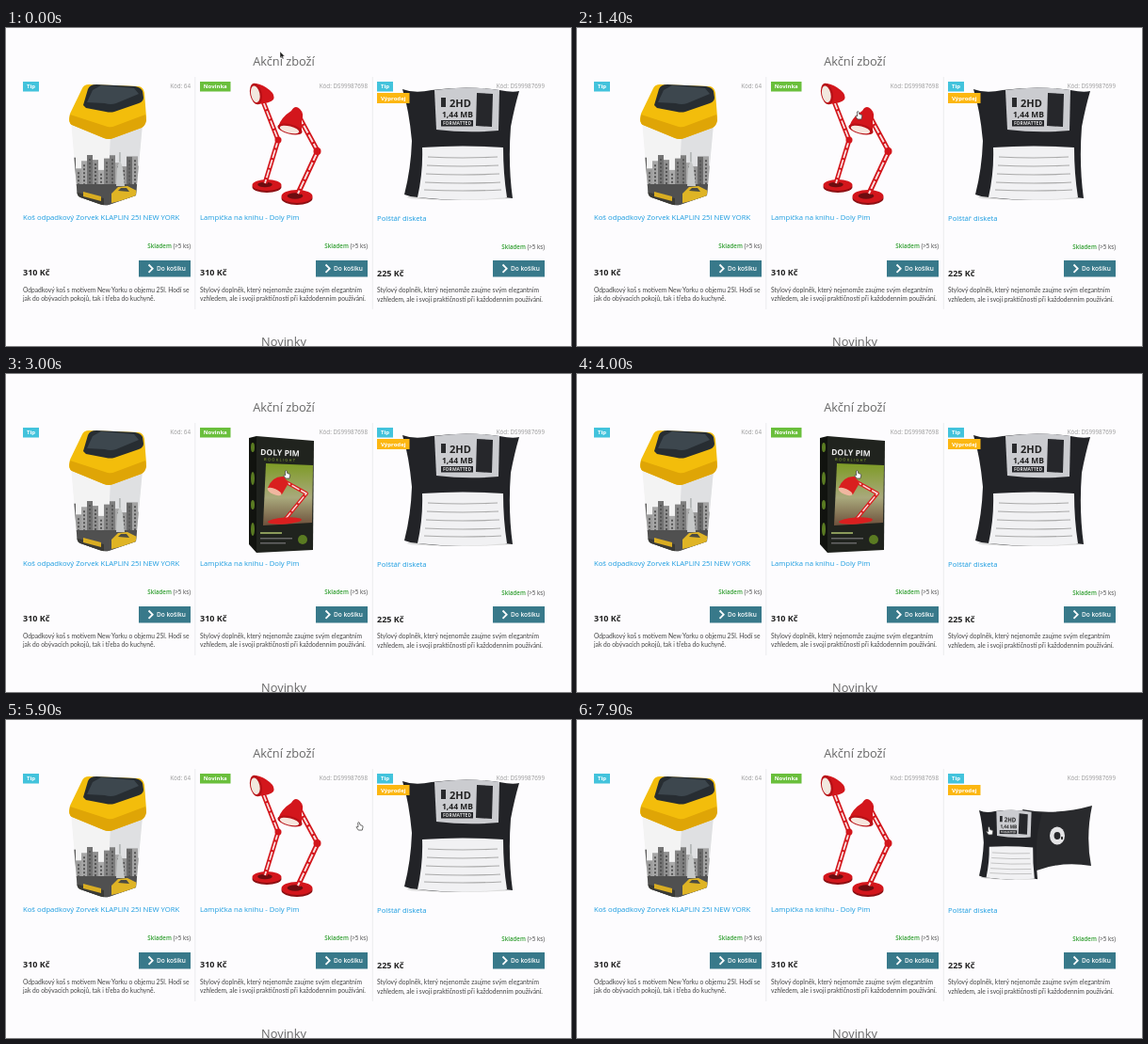
Write an HTML page that moves like this. It is 600 by 338 pixels and loops after 8 s.

```html
<!DOCTYPE html>
<html lang="cs">
<head>
<meta charset="utf-8">
<title>Akční zboží</title>
<style>
  html, body { margin: 0; height: 100%; overflow: hidden; background: #fdfcfe; }
  svg { display: block; width: 100vw; height: 100vh; font: 6.2px "Open Sans", sans-serif; }
  .head { font-size: 12.8px; fill: #666; text-anchor: middle; }
  .name { font-size: 7.7px; fill: #1a9ce0; }
  .code { font-size: 6.25px; fill: #999; text-anchor: end; }
  .stock { text-anchor: end; fill: #444; }
  .stock tspan { fill: #2f9e2f; font-weight: 600; }
  .price { font-size: 9px; font-weight: 700; fill: #222; }
  .button { font-size: 6.5px; font-weight: 600; fill: #fff; }
  .badge { font-size: 6px; font-weight: 700; fill: #fff; text-anchor: middle; }
  .note { font: 6.7px Lato, sans-serif; fill: #444; }
</style>
</head>
<body>
<svg id="stage" viewBox="0 0 600 338"></svg>
<script>
const stage = document.getElementById('stage');

const poly = (points, fill, extra = '') => `<polygon points="${points}" fill="${fill}" ${extra}/>`;
const path = (d, fill, extra = '') => `<path d="${d}" fill="${fill}" ${extra}/>`;
const rect = (x, y, w, h, fill) => `<rect x="${x}" y="${y}" width="${w}" height="${h}" fill="${fill}"/>`;
const oval = (x, y, rx, ry, fill, turn = 0) =>
  `<ellipse cx="${x}" cy="${y}" rx="${rx}" ry="${ry}" fill="${fill}" transform="rotate(${turn} ${x} ${y})"/>`;
const text = (x, y, cls, s, extra = '') => `<text x="${x}" y="${y}" class="${cls}" ${extra}>${s}</text>`;

// Two parallel rails with rungs between them
const arm = (d, width = 5) => path(d, 'none', `stroke="currentColor" stroke-width="${width}" stroke-linejoin="round"`) +
  path(d, 'none', `stroke="#fff" stroke-width="${width * .36}" stroke-dasharray="9 2" stroke-opacity=".85"`);

const badge = (x, y, w, h, fill, label) => rect(x, y, w, h, fill) + text(x + w / 2, y + h / 2 + 2.1, 'badge', label);

function card({ x, dy, code, name, price, note }) {
  return text(x + 178, 63.5, 'code', 'Kód: ' + code) +
    text(x, 204 + dy, 'name', name) +
    text(x + 178, 234.3 + dy, 'stock', '<tspan>Skladem</tspan> (&gt;5 ks)') +
    text(x, 263.3 + dy, 'price', price + ' Kč') +
    rect(x + 123, 247, 55, 17.5, '#38798a') +
    path(`M${x + 133.5} 251.5l4.2 4.2-4.2 4.2`, 'none', 'stroke="#fff" stroke-width="1.8"') +
    text(x + 142, 258, 'button', 'Do košíku') +
    note.map((line, i) => text(x, 280.6 + dy + i * 9.6, 'note', line)).join('');
}

function skyline() {
  let out = '';
  for (let i = 0; i < 13; i++) {
    const h = 30 + 17 * Math.abs(Math.sin(i * 2.3 + 1));
    const shade = 95 + Math.round(75 * Math.abs(Math.sin(i * 4.1)));
    out += rect(68 + i * 6, 182 - h, 6, h + 10, `rgb(${shade},${shade},${shade})`);
    out += path(`M${71 + i * 6} ${186 - h}v${h - 9}`, 'none', 'stroke="#555" stroke-width="2" stroke-dasharray="2 2"');
  }
  return out;
}

const bin = `<clipPath id="body"><path d="M69 98L145 102L138 178L109 188Q104 189 99 187L79 180Q76 179 75.5 175Z"/></clipPath>
  <g clip-path="url(#body)">${rect(66, 95, 82, 95, '#f3f3f3')}${poly('112,95 148,95 148,190 107,190', '#dfe0e2')}
  ${skyline()}${rect(66, 166, 82, 25, '#505050')}
  ${poly('117,168 118,149 121,140 124,149 126,168', '#c6c8c8')}${rect(120, 132, 1.8, 10, '#b5b8b8')}
  ${poly('72,174 104,181 104,189 75,184', '#3a3a36')}
  ${poly('82,174 101,179 101,184 82,179', '#d9ad22')}${poly('112,176 119,169 129,168 139,173 137,180 112,186', '#dfb425')}
  ${poly('119,173 122,170 128,170 131,174', '#4b4b42')}</g>` +
  path('M67 97L68 91L81 64Q83 60 88 60L141 62Q146 63 147 69L149 95Q149 103 144 106L114 117Q109 119 104 117L70 103Q67 101 67 97Z', '#f3bd0b') +
  path('M68 92L108 105Q112 106 116 104L148 92L149 98Q148 104 144 106L114 117Q109 119 104 117L70 103Q66 101 68 92Z', '#dfa506') +
  path('M82 82L87 65Q89 60 96 60L137 62Q143 63 145 67L146 74Q146 78 141 80L115 89Q111 90 106 89L85 85Z', '#272d32') +
  path('M92 66L101 61L136 64L141 70L117 80Q111 82 105 80L86 79Z', '#3d474e');

const lampBase = (x, y, rx, ry) => oval(x, y + 2, rx, ry, '#8c1014') + oval(x, y, rx, ry, 'currentColor') +
  oval(x - 2, y - .5, rx * .5, ry * .45, '#6c0d10');

const redLamps = `<g color="#d3161c">
  ${lampBase(277, 167, 15.5, 6)}${arm('M273 78L289 119L275 165')}
  ${oval(289, 119, 3.5, 3.5, 'currentColor')}
  ${path('M265 59Q273 60 280 66Q286 71 284 76Q281 80 267 81Z', 'currentColor')}
  ${oval(265.5, 70, 6.3, 11.5, '#b81117', -12)}${oval(264.8, 70.3, 4.6, 9, '#f2e8df', -12)}
  ${lampBase(309, 179, 16.5, 7)}${arm('M311 94L331 131L310 176', 5.5)}
  ${oval(330.5, 131, 4, 4, 'currentColor')}
  ${path('M289 105Q292 95 303 88Q307 81 312 86Q317 91 314 98L314 111Z', 'currentColor')}
  ${oval(301.5, 107.5, 13.4, 5.2, '#b81117', 14)}${oval(301, 108, 10.5, 3.6, '#f6e6de', 14)}</g>`;

const lampBox = poly('258,68 266,66 266,190 258,181', '#11130f') + poly('266,66 327,71 326,187 266,190', '#20231e') +
  [78, 111, 139, 165].map((y, i) => oval(262, y, 2, i % 2 ? 7 : 5, '#5a7b22')).join('') +
  text(270, 86, '', 'DOLY PIM', 'fill="#eee" font-size="8.6" font-weight="700" transform="rotate(2 270 86)"') +
  text(274, 92, '', 'BOOKLIGHT', 'fill="#9bbd3a" font-size="4" letter-spacing="1.3" transform="rotate(2 274 92)"') +
  '<linearGradient id="leaf" x2="0" y2="1"><stop stop-color="#7d9b25"/><stop offset=".55" stop-color="#a9a97c"/><stop offset="1" stop-color="#6d513c"/></linearGradient>' +
  poly('276,95 326,97 325,158 273,161', 'url(#leaf)') +
  `<g color="#d91f1f">${arm('M294 113L319 127L296 155', 4)}${path('M278 121Q283 108 295 109L300 116L293 128Z', 'currentColor')}
  ${oval(285, 125, 8, 3, '#f0b7a0', 24)}${oval(296, 156, 18, 3.5, 'currentColor', -4)}</g>` +
  rect(270, 168, 23, 2, '#8a9a5a') + rect(270, 174, 34, 1.5, '#666') + rect(270, 179, 27, 1.5, '#666') + oval(315, 176, 5, 5, '#5a7b22');

const deskLamp = (color, dx, dy) => `<g color="${color}" transform="translate(${dx} ${dy})">
  ${arm('M268 93L230 120L259 158', 4)}${oval(230, 120, 3.3, 3.3, 'currentColor')}
  ${oval(262, 162, 22, 4, 'currentColor')}${oval(259, 160.5, 9, 1.6, '#0005')}
  ${path('M265 96Q264 89 272 87Q276 81 282 85Q291 90 293 101Q285 108 272 106Z', 'currentColor')}
  ${oval(283, 104, 10.5, 2.8, '#0004', -13)}</g>`;
const lampPair = deskLamp('#d3161c', 0, 0) + deskLamp('#222426', 61, 1);

const pillow = oval(482, 180, 56, 3, '#ddd') +
  path('M421 65Q434 70 452 66Q490 61 524 66Q538 69 545 67Q540 84 536 105Q533 145 538 181Q522 178 500 181Q465 184 438 180Q430 180 423 177Q430 150 431 120Q428 87 421 65Z', '#222327') +
  path('M455 66Q490 61 524 66L523 109Q490 112 457 108Z', '#cbccd0') +
  path('M500 69L517 70L516 105L499 104Z', '#26272b') + rect(462, 74, 5, 10, '#292a2d') +
  text(471, 84, '', '2HD', 'fill="#222" font-size="11" font-weight="700"') +
  text(463, 95, '', '1,44 MB', 'fill="#222" font-size="8.5" font-weight="700"') +
  rect(462, 98, 34, 6.5, '#242529') +
  text(479, 103.1, '', 'FORMATTED', 'fill="#ddd" font-size="5" font-weight="700" text-anchor="middle"') +
  path('M442 127Q485 124 528 127Q528 155 532 180Q485 185 437 180Q443 153 442 127Z', '#f1f1f3') +
  [137, 146, 155, 164, 172].map((y, i) =>
    path(`M${448 - i} ${y}Q485 ${y + 2} ${522 + i} ${y}`, 'none', 'stroke="#aaa" stroke-width="1.1"')).join('');

const pillowPair = path('M473 95Q508 102 547 91Q540 124 546 155Q514 150 488 160Q484 125 473 95Z', '#292a2d') +
  oval(510, 123, 8, 9.5, '#e4e4e6') + oval(510, 123, 3.4, 4, '#27282b') + rect(514, 124, 2, 3, '#333') +
  `<g transform="translate(427 96) scale(.54 .62) rotate(1) translate(-421 -65)">${pillow}</g>`;

const cards = [
  { x: 18, dy: 0, code: '64', name: 'Koš odpadkový Zorvek KLAPLIN 25l NEW YORK', price: 310,
    note: ['Odpadkový koš s motivem New Yorku o objemu 25l. Hodí se', 'jak do obývacích pokojů, tak i třeba do kuchyně.'] },
  { x: 206, dy: 0, code: 'DS99987698', name: 'Lampička na knihu - Doly Pim', price: 310,
    note: ['Stylový doplněk, který nejenomže zaujme svým elegantním', 'vzhledem, ale i svojí praktičností při každodenním používání.'] },
  { x: 394, dy: .8, code: 'DS99987699', name: 'Polštář disketa', price: 225,
    note: ['Stylový doplněk, který nejenomže zaujme svým elegantním', 'vzhledem, ale i svojí praktičností při každodenním používání.'] },
];

const group = (id, content) => `<g id="${id}">${content}</g>`;
stage.innerHTML = rect(0, 0, 600, 338, '#fdfcfe') +
  text(295, 39.5, 'head', 'Akční zboží') + text(295, 338.3, 'head', 'Novinky') +
  rect(200.3, 52, 1, 247, '#ececee') + rect(388.8, 52, 1, 247, '#ececee') +
  cards.map(card).join('') + bin +
  group('lamp0', redLamps) + group('lamp1', lampBox) + group('lamp2', lampPair) +
  group('pillow0', pillow) + group('pillow1', pillowPair) +
  badge(18, 57, 17, 10.5, '#43c3dc', 'Tip') + badge(206, 57, 32.5, 10.5, '#6abf3c', 'Novinka') +
  badge(394, 57, 17, 10.5, '#43c3dc', 'Tip') + badge(394, 69, 34.5, 11, '#fcb712', 'Výprodej') +
  group('arrow', path('M0 0V7L1.7 5.5L2.8 8L4 7.5L2.9 5.1H5Z', '#222', 'stroke="#fff" stroke-width=".4"')) +
  group('hand', path('M-1.5-4Q-.5-5 .2-3.8L.8-1.4L3.3-.7Q4-.3 3.7 1L3 4H-1L-3.3.8Q-3.2-.3-1.3.7Z', '#fff', 'stroke="#444" stroke-width=".8"'));

const el = id => document.getElementById(id);
const show = (id, on) => el(id).style.display = on ? '' : 'none';

// Cursor stops: time, x, y
const stops = [[0, 291, 25], [150, 291, 25], [950, 298, 88], [1400, 299, 93], [1800, 298, 107],
  [5500, 298, 107], [6250, 438, 118], [8000, 438, 118]];

function cursorAt(t) {
  const i = stops.findIndex(s => s[0] > t);
  const [t0, x0, y0] = stops[i - 1], [t1, x1, y1] = stops[i];
  const p = (t - t0) / (t1 - t0), k = p * p * (3 - 2 * p);
  return [x0 + (x1 - x0) * k, y0 + (y1 - y0) * k];
}

function draw(now) {
  const t = now % 8000;
  const [x, y] = cursorAt(t);
  const lamp = t < 2500 || t >= 5900 ? 0 : t < 4500 ? 1 : 2;
  for (let i = 0; i < 3; i++) show('lamp' + i, i === lamp);
  show('pillow0', t < 7500);
  show('pillow1', t >= 7500);
  const overCard = y > 52;
  show('arrow', !overCard);
  show('hand', overCard);
  el(overCard ? 'hand' : 'arrow').setAttribute('transform', `translate(${x} ${y})`);
}

const start = performance.now();
function loop() {
  draw(performance.now() - start);
  requestAnimationFrame(loop);
}
loop();
</script>
</body>
</html>
```
